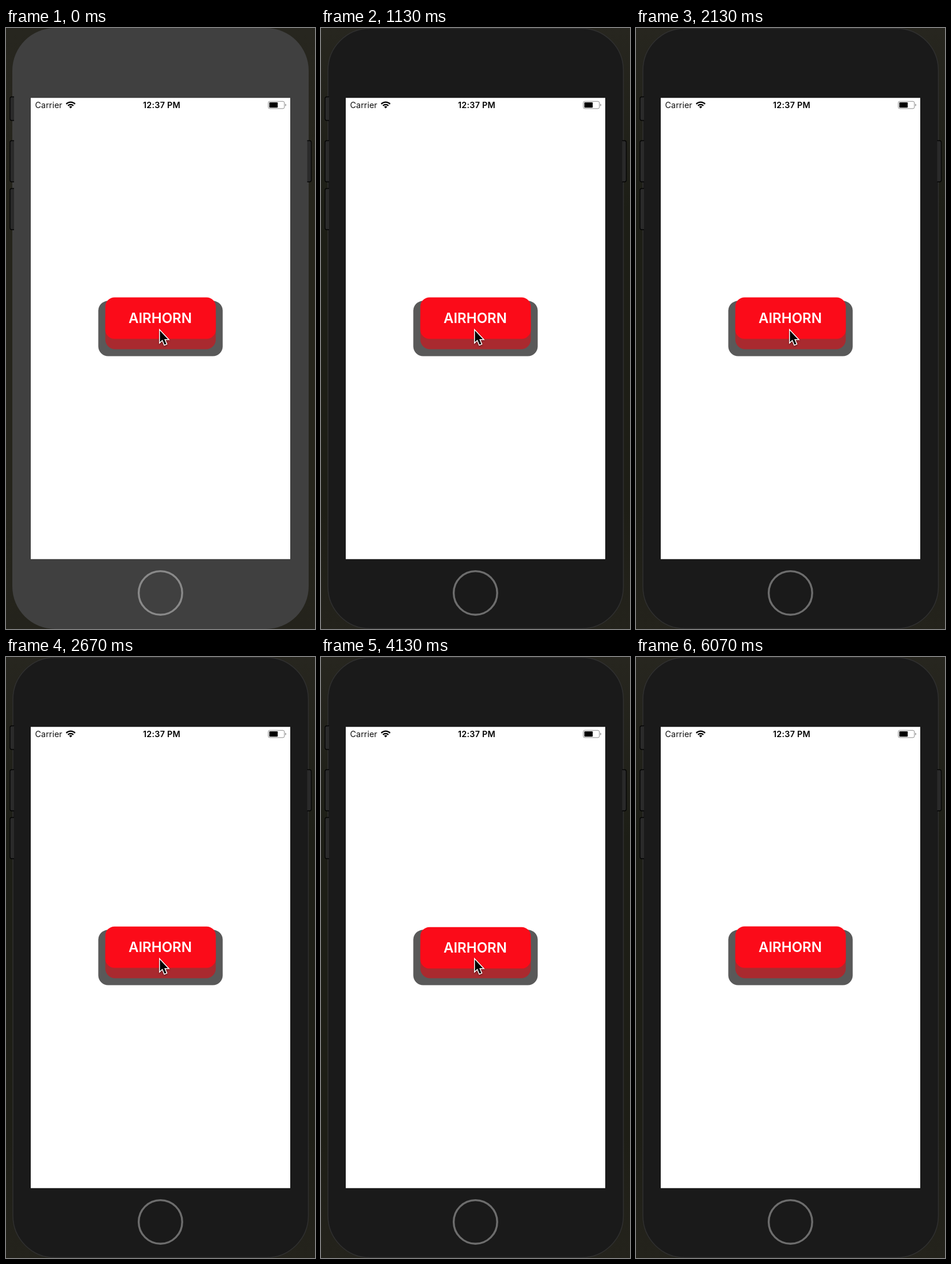
Write an HTML page with a canvas that moves like this. It is 537 px wide and 1043 px high and loops after 6.14 s.

```html
<!DOCTYPE html>
<html lang="en">
<head>
<meta charset="utf-8">
<title>Airhorn button</title>
<style>
html, body { margin: 0; width: 100%; height: 100%; overflow: hidden; background: #1e1e16; }
canvas { display: block; }
</style>
</head>
<body>
<canvas id="stage" width="537" height="1043"></canvas>
<script>
const ctx = document.getElementById('stage').getContext('2d');
const FONT = 'Inter, Roboto, sans-serif';
const LOOP = 6140;
const TRAVEL = 18;
const DOWN_MS = 110;
const UP_MS = 200;

// [press, release] times in ms
const TAPS = [
  [182, 340], [650, 890], [1250, 1450], [1720, 1910],
  [2230, 2500], [2980, 3280], [3530, 3800], [4112, 4340]
];

// [time, x, y] of the pointer tip
const POINTER = [
  [0, 266.3, 522.5], [4400, 266.3, 522.5], [4600, 412, 446],
  [4670, 406, 472], [4990, 406, 472], [5330, 310, 1060]
];

const clamp = v => Math.max(0, Math.min(1, v));
const easeInOut = p => p < 0.5 ? 2 * p * p : 1 - 2 * (1 - p) ** 2;
const easeOut = p => 1 - (1 - p) ** 3;

function pressDepth(t) {
  const tap = TAPS.findLast(([start]) => t >= start);
  if (!tap) return 0;
  const down = easeInOut(clamp((t - tap[0]) / DOWN_MS));
  const up = easeOut(clamp((t - tap[1]) / UP_MS));
  return TRAVEL * down * (1 - up);
}

function pointerAt(t) {
  const i = POINTER.findIndex(([time]) => time > t);
  if (i < 0) return null;
  const [t0, x0, y0] = POINTER[i - 1];
  const [t1, x1, y1] = POINTER[i];
  const p = (t - t0) / (t1 - t0);
  return [x0 + (x1 - x0) * p, y0 + (y1 - y0) * p];
}

function box(x, y, w, h, r, fill, stroke, width = 1) {
  ctx.beginPath();
  ctx.roundRect(x, y, w, h, r);
  if (fill) {
    ctx.fillStyle = fill;
    ctx.fill();
  }
  if (stroke) {
    ctx.strokeStyle = stroke;
    ctx.lineWidth = width;
    ctx.stroke();
  }
}

function label(text, x, y, size, weight, color, align = 'left') {
  ctx.font = `${weight} ${size}px ${FONT}`;
  ctx.textAlign = align;
  ctx.fillStyle = color;
  ctx.fillText(text, x, y);
}

function sideKey(x, y, h, left) {
  const radii = left ? [3, 0, 0, 3] : [0, 3, 3, 0];
  box(x, y, 7, h, radii, '#2a2a2a');
  const outer = left ? x : x + 7;
  const inner = left ? x + 7 : x;
  ctx.beginPath();
  ctx.moveTo(inner, y);
  ctx.arcTo(outer, y, outer, y + h, 3);
  ctx.arcTo(outer, y + h, inner, y + h, 3);
  ctx.lineTo(inner, y + h);
  ctx.strokeStyle = '#050505';
  ctx.lineWidth = 1.4;
  ctx.stroke();
}

function drawPhone(lit) {
  const back = ctx.createLinearGradient(0, 0, 0, 1043);
  back.addColorStop(0, '#27261f');
  back.addColorStop(0.3, lit ? '#25241b' : '#1d1e16');
  back.addColorStop(0.8, lit ? '#25241b' : '#1e1e16');
  back.addColorStop(1, '#24231c');
  ctx.fillStyle = back;
  ctx.fillRect(0, 0, 537, 1043);

  if (lit) box(11, 0, 515, 1043, 74, '#404040');
  else box(12, 0.7, 513.5, 1041.6, 73, '#1a1a1a', '#303030', 1.5);

  sideKey(7, 119.5, 41, true);
  sideKey(7, 195.5, 71.5, true);
  sideKey(7, 278.5, 71.5, true);
  sideKey(523.5, 195.5, 71.5, false);

  box(42.5, 120.5, 452, 802, 0, lit ? '#303030' : '#111');
  box(43, 121.3, 451, 800.4, 0, '#fff');

  ctx.beginPath();
  ctx.arc(268.4, 980.4, 37.8, 0, Math.PI * 2);
  ctx.strokeStyle = lit ? '#898989' : '#6d6d6d';
  ctx.lineWidth = 3.4;
  ctx.stroke();
}

function drawWifi(x, y) {
  const from = -Math.PI * 0.75, to = -Math.PI * 0.25;
  ctx.fillStyle = ctx.strokeStyle = '#000';
  ctx.beginPath();
  ctx.moveTo(x, y);
  ctx.arc(x, y, 3.9, from, to);
  ctx.fill();
  ctx.lineWidth = 2.2;
  for (const r of [6.7, 10.9]) {
    ctx.beginPath();
    ctx.arc(x, y, r, from, to);
    ctx.stroke();
  }
}

function drawStatusBar() {
  label('Carrier', 50.6, 139, 14.4, 400, '#111');
  drawWifi(112.4, 139.6);
  ctx.letterSpacing = '0.2px';
  label('12:37 PM', 270.5, 139, 14.4, 600, '#000', 'center');
  ctx.letterSpacing = '0px';
  box(455.8, 127.3, 28, 12.6, 2.6, null, '#8c8c8c');
  box(457.6, 129, 14.6, 9.2, 1, '#000');
  box(485.2, 131.4, 1.7, 4.4, [0, 1.7, 1.7, 0], '#999');
}

function drawButton(depth) {
  box(160.4, 473.6, 216.2, 96, 17, '#595959');
  box(172.6, 485.6, 192, 71.9, 17, '#a92a2f');
  const y = 467.6 + depth;
  box(172.6, y, 192, 71.9, 16, '#fb0b19');
  label('AIRHORN', 268, y + 44.6, 24, 600, '#fff', 'center');
}

function drawPointer([x, y]) {
  ctx.save();
  ctx.translate(x, y);
  ctx.beginPath();
  ctx.moveTo(1.2, 2.8);
  ctx.lineTo(1.2, 22.6);
  ctx.lineTo(5.6, 18.5);
  ctx.lineTo(9.2, 27);
  ctx.lineTo(12.3, 25.7);
  ctx.lineTo(8.8, 17.4);
  ctx.lineTo(15, 17.4);
  ctx.closePath();
  ctx.shadowColor = 'rgba(0,0,0,0.4)';
  ctx.shadowBlur = 3;
  ctx.shadowOffsetY = 1.5;
  ctx.strokeStyle = '#fff';
  ctx.lineWidth = 3;
  ctx.stroke();
  ctx.shadowColor = 'transparent';
  ctx.fillStyle = '#000';
  ctx.fill();
  ctx.restore();
}

function render(now) {
  const t = now % LOOP;
  drawPhone(t < 70);
  drawStatusBar();
  drawButton(pressDepth(t));
  const tip = pointerAt(t);
  if (tip) drawPointer(tip);
}

const start = performance.now();
function tick() {
  render(performance.now() - start);
  requestAnimationFrame(tick);
}
tick();
</script>
</body>
</html>
```
